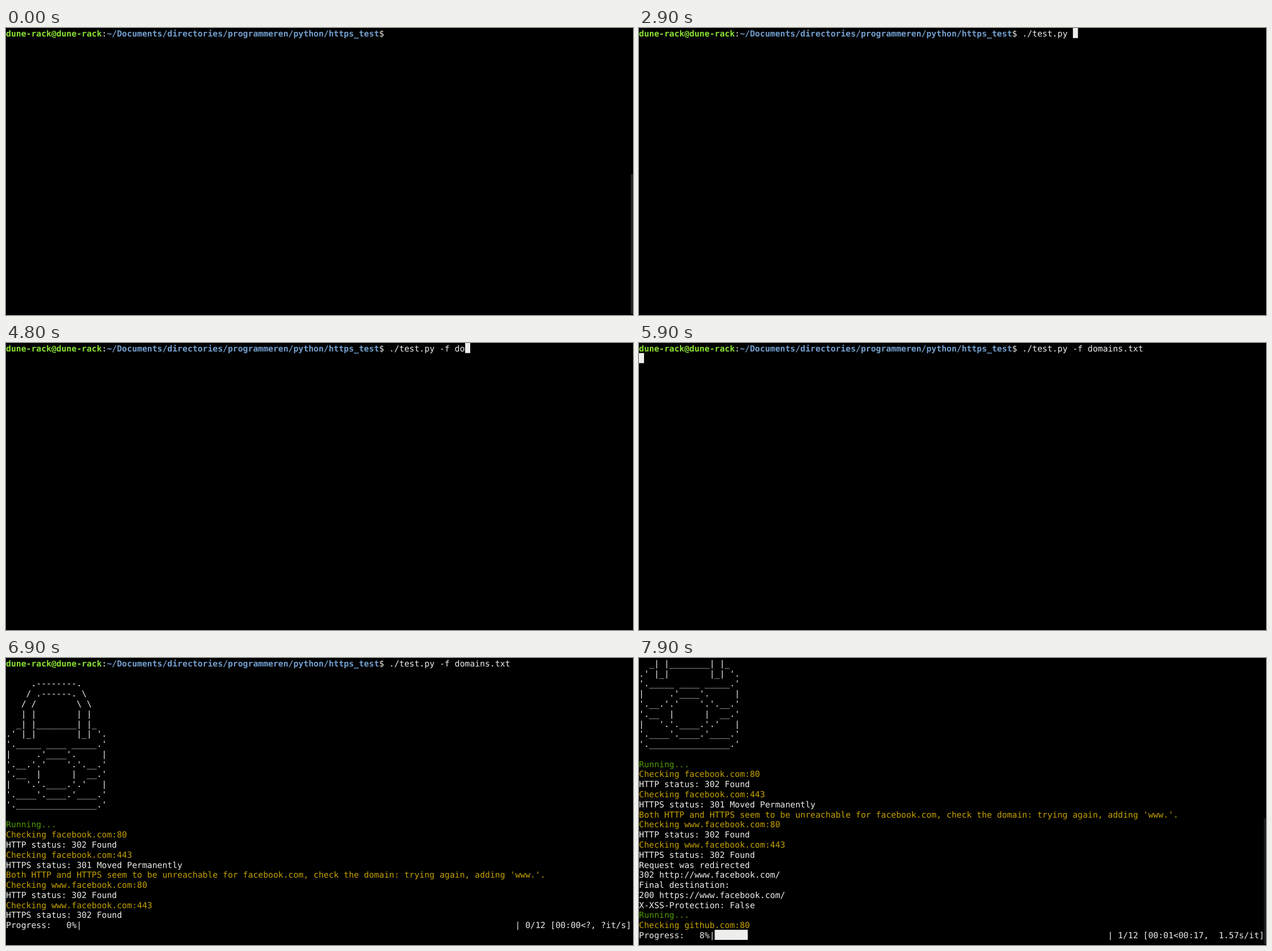
An HTML page for the animation above (8 s loop, 1105 by 507 pixels).

```html
<!DOCTYPE html>
<html lang="en">
<head>
<meta charset="utf-8">
<title>Terminal session</title>
<style>
  html, body { margin: 0; width: 1105px; height: 507px; overflow: hidden; background: #000; }
  #screen { position: relative; width: 1105px; height: 507px; overflow: hidden; background: #000; }
  /* a grid of 9 by 18 cells, shown slightly reduced */
  #text {
    position: absolute; left: 0; top: 0; width: 1118px; height: 513px;
    transform: scale(.988); transform-origin: 0 0;
    color: #eeeeec;
    font: 14.95px/18px "DejaVu Sans Mono", monospace;
    text-rendering: geometricPrecision;
    font-variant-ligatures: none; font-kerning: none;
  }
  .row { position: absolute; left: 0; margin-top: 1px; white-space: pre; }
  .block { position: absolute; height: 18px; background: #eeeeec; }
  .user { color: #8ae234; font-weight: bold; }
  .path { color: #729fcf; font-weight: bold; }
  .ok { color: #4e9a06; }
  .check { color: #c4a000; }
  #thumb { position: absolute; left: 1101px; width: 4px; border-radius: 1px; }
</style>
</head>
<body>
<div id="screen"><div id="text"></div><div id="thumb"></div></div>
<script>
const LOOP = 8000, CELL_W = 9, CELL_H = 18, COLS = 124, LAST_ROW = 27;
const PROMPT_COLS = 76;
const COMMAND = './test.py -f domains.txt ';

// time, typed characters, cursor visible
const TYPING = [
  [0, 0, 0], [400, 0, 1], [1000, 0, 0], [1600, 0, 1], [1900, 2, 1],
  [2300, 3, 1], [2400, 4, 1], [2500, 5, 1], [2700, 6, 1], [2900, 10, 1],
  [3300, 10, 0], [3800, 10, 1], [3900, 11, 1], [4100, 13, 1], [4800, 15, 1],
  [4900, 16, 1], [5400, 25, 1], [5600, 25, 0], [5800, 25, 1]
];
const ENTER = 5900;

// time, printed lines, finished domains
const OUTPUT = [[6200, 19, 0], [6400, 22, 0], [6700, 24, 0], [6900, 25, 0], [7700, 32, 1]];

// time, top, height, colour
const THUMB = [
  [0, 258, 247, '#242424'], [100, 258, 247, '#121212'], [400, 258, 0, '#000'],
  [7900, 283, 222, '#1c1c1c']
];

const LOCK = String.raw`
     .--------.
    / .------. \
   / /        \ \
   | |        | |
  _| |________| |_
.' |_|        |_| '.
'._____ ____ _____.'
|     .'____'.     |
'.__.'.'    '.'.__.'
'.__  |      |  __.'
|   '.'.____.'.'   |
'.____'.____.'____.'
'.________________.'
`;

const LOG = LOCK.split('\n').concat([
  'Running...',
  'Checking facebook.com:80',
  'HTTP status: 302 Found',
  'Checking facebook.com:443',
  'HTTPS status: 301 Moved Permanently',
  "Both HTTP and HTTPS seem to be unreachable for facebook.com, check the domain: trying again, adding 'www.'.",
  'Checking www.facebook.com:80',
  'HTTP status: 302 Found',
  'Checking www.facebook.com:443',
  'HTTPS status: 302 Found',
  'Request was redirected',
  '302 http://www.facebook.com/',
  'Final destination:',
  '200 https://www.facebook.com/',
  'X-XSS-Protection: False',
  'Running...',
  'Checking github.com:80'
]);

const text = document.getElementById('text');
const thumb = document.getElementById('thumb');

const stepAt = (steps, t) => steps.filter(s => s[0] <= t).pop();

function span(content, cls) {
  const el = document.createElement('span');
  el.textContent = content;
  if (cls) el.className = cls;
  return el;
}

function addRow(row, ...parts) {
  const el = document.createElement('div');
  el.className = 'row';
  el.style.top = row * CELL_H + 'px';
  el.append(...parts);
  text.append(el);
}

function addBlock(row, col, cells) {
  const el = document.createElement('div');
  el.className = 'block';
  el.style.left = col * CELL_W + 'px';
  el.style.top = row * CELL_H + 'px';
  el.style.width = cells * CELL_W + 'px';
  text.append(el);
}

function lineClass(line) {
  if (line.startsWith('Running')) return 'ok';
  return /^(Checking|Both)/.test(line) ? 'check' : '';
}

function addPrompt(row, typed) {
  addRow(row, span('dune-rack@dune-rack', 'user'), ':',
    span('~/Documents/directories/programmeren/python/https_test', 'path'),
    '$ ' + COMMAND.slice(0, typed));
}

function addProgress(row, done) {
  const head = done ? 'Progress:   8%|' : 'Progress:   0%|';
  const tail = done ? '| 1/12 [00:01<00:17,  1.57s/it]' : '| 0/12 [00:00<?, ?it/s]';
  const room = COLS - head.length - tail.length;
  addRow(row, head + ' '.repeat(room) + tail);
  if (done) addBlock(row, head.length, room * done / 12);
}

function draw(t) {
  text.replaceChildren();
  const [, typed, cursor] = stepAt(TYPING, t);
  const output = stepAt(OUTPUT, t);
  const lines = output ? output[1] : 0;
  const scroll = Math.max(0, lines + 1 - LAST_ROW);

  if (!scroll) addPrompt(0, typed);
  if (output) {
    LOG.slice(0, lines).forEach((line, i) => {
      const row = i + 1 - scroll;
      if (row >= 0 && line) addRow(row, span(line, lineClass(line)));
    });
    addProgress(lines + 1 - scroll, output[2]);
  } else if (t >= ENTER) {
    addBlock(1, 0, 1);
  } else if (cursor) {
    addBlock(0, PROMPT_COLS + typed, 1);
  }

  const [, top, height, colour] = stepAt(THUMB, t);
  Object.assign(thumb.style, { top: top + 'px', height: height + 'px', background: colour });
}

const changes = [...TYPING, [ENTER], ...OUTPUT, ...THUMB].map(s => s[0]);
const start = performance.now();
let shown = -1;

function tick() {
  const t = (performance.now() - start) % LOOP;
  const current = Math.max(...changes.filter(c => c <= t));
  if (current !== shown) draw(shown = current);
  requestAnimationFrame(tick);
}
tick();
</script>
</body>
</html>
```
